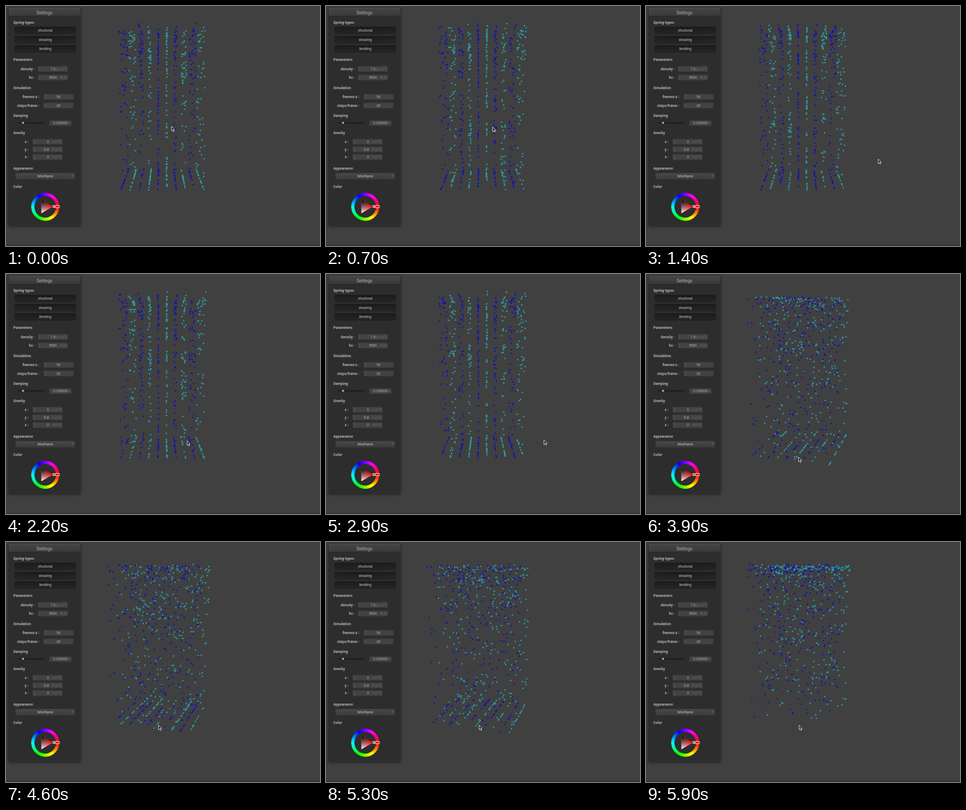
These frames come from a looping animation (600 px wide and 459 px high, 6 s). An HTML page with a canvas:

```html
<!DOCTYPE html>
<html lang="en">
<head>
<meta charset="utf-8">
<title>Particle settings</title>
<style>
  html, body { margin: 0; width: 100%; height: 100%; overflow: hidden; background: #404040; }
  #stage { position: relative; width: 600px; height: 459px; overflow: hidden; background: #404040; }
  #stage > * { position: absolute; left: 0; top: 0; }
  #panel {
    left: 5px; top: 3px; width: 137px; height: 417px; border-radius: 2px;
    background: #2d2d2d; box-shadow: 0 1px 5px 1px rgba(0, 0, 0, .45);
  }
  #panel::before {
    content: ""; display: block; height: 17px; border-radius: 2px 2px 0 0;
    background: linear-gradient(#464646, #393939);
    border-top: 1px solid #4c4c4c; border-bottom: 1px solid #272727; box-sizing: border-box;
  }
  #wheel {
    left: 48px; top: 356.5px; width: 54px; height: 54px; border-radius: 50%;
    background: conic-gradient(from 90deg, red, yellow, lime, cyan, blue, magenta, red);
    -webkit-mask: radial-gradient(circle, transparent 20.3px, #000 21px);
    mask: radial-gradient(circle, transparent 20.3px, #000 21px);
  }
  text { font-family: Roboto, sans-serif; font-size: 6.6px; fill: #b4b4b4; }
  .title { font-size: 8.3px; }
  .head, .label { font-size: 7px; font-weight: 700; }
  .button { font-size: 6.5px; fill: #c8c8c8; }
  .unit { fill: #666; }
</style>
</head>
<body>
<div id="stage">
  <canvas id="dots" width="600" height="459"></canvas>
  <div id="panel"></div>
  <div id="wheel"></div>
  <svg id="ui" width="600" height="459" viewBox="0 0 600 459">
    <defs>
      <linearGradient id="pushed" x2="0" y2="1">
        <stop stop-color="#1b1b1b"/><stop offset="1" stop-color="#262626"/>
      </linearGradient>
      <linearGradient id="raised" x2="0" y2="1">
        <stop stop-color="#484848"/><stop offset="1" stop-color="#3b3b3b"/>
      </linearGradient>
      <linearGradient id="tint" gradientUnits="userSpaceOnUse" x1="90" y1="383.5" x2="67.5" y2="396.5">
        <stop stop-color="#f00"/><stop offset="1" stop-color="#fff"/>
      </linearGradient>
      <linearGradient id="shade" gradientUnits="userSpaceOnUse" x1="79" y1="390" x2="67.5" y2="370.5">
        <stop stop-color="#000" stop-opacity="0"/><stop offset="1" stop-color="#000"/>
      </linearGradient>
    </defs>
    <g id="widgets"></g>
    <path d="M90 383.5 67.5 370.5V396.5Z" fill="url(#tint)"/>
    <path d="M90 383.5 67.5 370.5V396.5Z" fill="url(#shade)"/>
    <rect x="94" y="381.3" width="8" height="4.6" rx="1" fill="none" stroke="#fff"/>
    <circle cx="91.5" cy="383.5" r="2.3" fill="#d33" stroke="#fff"/>
    <path d="M0 457.5V459H600V457.5Z" fill="#2c2c2c"/>
    <path id="cursor" d="M.5.5V9L2.5 7.2 4 10.3 5.3 9.7 3.9 6.6H6.4Z"
          fill="#1c1c1c" stroke="#eee" stroke-width=".9" stroke-linejoin="round"/>
  </svg>
</div>
<script>
const LOOP = 6000, STEP = 100;

// Settings panel
const widgets = document.getElementById('widgets');

function add(name, attrs, content) {
  const el = document.createElementNS('http://www.w3.org/2000/svg', name);
  for (const key in attrs) el.setAttribute(key, attrs[key]);
  if (content) el.textContent = content;
  widgets.append(el);
}

const label = (cls, x, y, content, anchor = 'start') =>
  add('text', { class: cls, x, y, 'text-anchor': anchor }, content);

function button(x, y, w, h, fill, edge, content) {
  add('rect', { x, y, width: w, height: h, rx: 1.5, fill: `url(#${fill})`, stroke: edge, 'stroke-width': .7 });
  label('button', 75, y + h / 2 + 2.3, content, 'middle');
}

function field(x, y, w) {
  add('rect', { x, y, width: w, height: 10.5, rx: 1.5, fill: '#424242', stroke: '#383838', 'stroke-width': .6 });
}

function spinner(name, right, x, y, value, unit, end) {
  label('label', right, y + 7.6, name + ' :', 'end');
  field(x, y, 57);
  add('path', {
    d: `M${x + 2} ${y + 4.2}l1.6-1.7 1.6 1.7m0 2.4l-1.6 1.7-1.6-1.7`,
    fill: 'none', stroke: '#6c6c6c', 'stroke-width': .7
  });
  if (unit) label('unit', x + 55.5, y + 7.6, unit, 'end');
  label('value', end, y + 7.6, value, 'end');
}

label('title', 73.5, 15.7, 'Settings', 'middle');
[['Spring types', 34], ['Parameters', 104.7], ['Simulation', 158.5], ['Damping', 212.4],
 ['Gravity', 244.6], ['Appearance', 313.2], ['Color', 348.2]]
  .forEach(([name, y]) => label('head', 14, y, name));
['structural', 'shearing', 'bending']
  .forEach((name, i) => button(17, 40 + i * 17.7, 116, 13, 'pushed', '#181818', name));
spinner('density', 55, 61, 115, '7.5', 'g/cm^2', 94.5);
spinner('ks', 55, 61, 131.5, '5000', 'N/m', 97);
spinner('frames/s', 63.5, 72, 168.5, '90', '', 104);
spinner('steps/frame', 63.5, 72, 185, '30', '', 104);
add('rect', { x: 22, y: 222.3, width: 52, height: 2.6, rx: 1.2, fill: '#1e1e1e' });
add('circle', { cx: 32.5, cy: 223.4, r: 3.5, fill: '#444', stroke: '#1a1a1a', 'stroke-width': .7 });
add('circle', { cx: 32.5, cy: 223.4, r: 1.8, fill: '#aaa' });
field(83, 218.7, 42);
label('value', 118, 226.3, '0.200000', 'end');
label('unit', 123.5, 226.3, '%', 'end');
[['x', '0'], ['y', '-9.8'], ['z', '0']]
  .forEach(([axis, value], i) => spinner(axis, 43, 51, 254.3 + i * 14.7, value, 'm/s^2', 82));
button(18, 319.3, 114, 12.5, 'raised', '#333', 'Wireframe');
add('path', { d: 'M125.6 324.3h2.6l-1.3 1.8z', fill: '#999' });

// Pointer and view: time, x, y, view turn
const TRACK = [
  [0, 316, 230, 0], [700, 318, 231, 0], [1200, 444, 290, 0], [1500, 443, 293, 0],
  [2100, 347, 318, 0], [2300, 344, 319, 0], [2900, 416, 317, 0], [3100, 413, 318, 0],
  [3500, 352, 326, 0], [3800, 291, 350, 1], [4600, 291, 350, 1], [5300, 292, 350, 1], [6000, 292, 350, 1]
];

function pose(t) {
  const i = TRACK.findIndex(k => k[0] > t);
  const a = TRACK[i - 1], b = TRACK[i];
  const u = (t - a[0]) / (b[0] - a[0]);
  const e = u * u * (3 - 2 * u);
  return a.map((v, n) => v + (b[n] - v) * e);
}

// Falling particles in a box, seen by an orbiting camera
const COLS = 10, ROWS = 70, FALL = 1500, REST = 310, RESET = 5700;
const TOP = 2.5, FLOOR = -1.42, DEPTH = 1.122;
const FOCAL = 730, DIST = 10.13, DEG = Math.PI / 180;

let seed = 41;
function random() {
  seed = (seed + 0x6D2B79F5) | 0;
  let n = Math.imul(seed ^ seed >>> 15, 1 | seed);
  n ^= n + Math.imul(n ^ n >>> 7, 61 | n);
  return ((n ^ n >>> 14) >>> 0) / 4294967296;
}

const particles = Array.from({ length: COLS * ROWS }, (_, i) => {
  const col = i % COLS, row = Math.floor(i / COLS);
  return {
    x: col / (COLS - 1) * 2 - 1,
    z: (row / (ROWS - 1) * 2 - 1) * DEPTH,
    color: col % 2 ? '#2a98a6' : '#1414b2',
    phase: random() * (FALL + REST),
    delay: random() * 160
  };
});

function height(p, t) {
  let age = (Math.min(t, RESET) + p.phase) % (FALL + REST);
  if (t >= RESET) {
    // Everything on the floor goes back to the top
    age = age >= FALL ? Math.max(0, t - RESET - p.delay) : (age + t - RESET) % FALL;
  }
  const u = Math.min(1, age / FALL);
  return TOP + (FLOOR - TOP) * u * (.2 + .8 * u);
}

const ctx = document.getElementById('dots').getContext('2d');
const cursor = document.getElementById('cursor');

function draw(t) {
  const [, mx, my, turn] = pose(t);
  cursor.setAttribute('transform', `translate(${mx} ${my})`);
  const yaw = 16.6 * turn * DEG, pitch = (6.46 + 6.74 * turn) * DEG;
  const cy = Math.cos(yaw), sy = Math.sin(yaw), cp = Math.cos(pitch), sp = Math.sin(pitch);
  ctx.clearRect(0, 0, 600, 459);
  for (const p of particles) {
    const y = height(p, t);
    const x = p.x * cy - p.z * sy, z = p.x * sy + p.z * cy;
    const scale = FOCAL / (DIST - z * cp - y * sp);
    ctx.fillStyle = p.color;
    ctx.beginPath();
    ctx.arc(299 + x * scale, 229.5 - (y * cp - z * sp) * scale, 1.5, 0, 7);
    ctx.fill();
  }
}

const start = performance.now();
let last = -1;
function tick() {
  const t = Math.floor((performance.now() - start) % LOOP / STEP) * STEP;
  if (t !== last) draw(last = t);
  requestAnimationFrame(tick);
}
tick();
</script>
</body>
</html>
```
